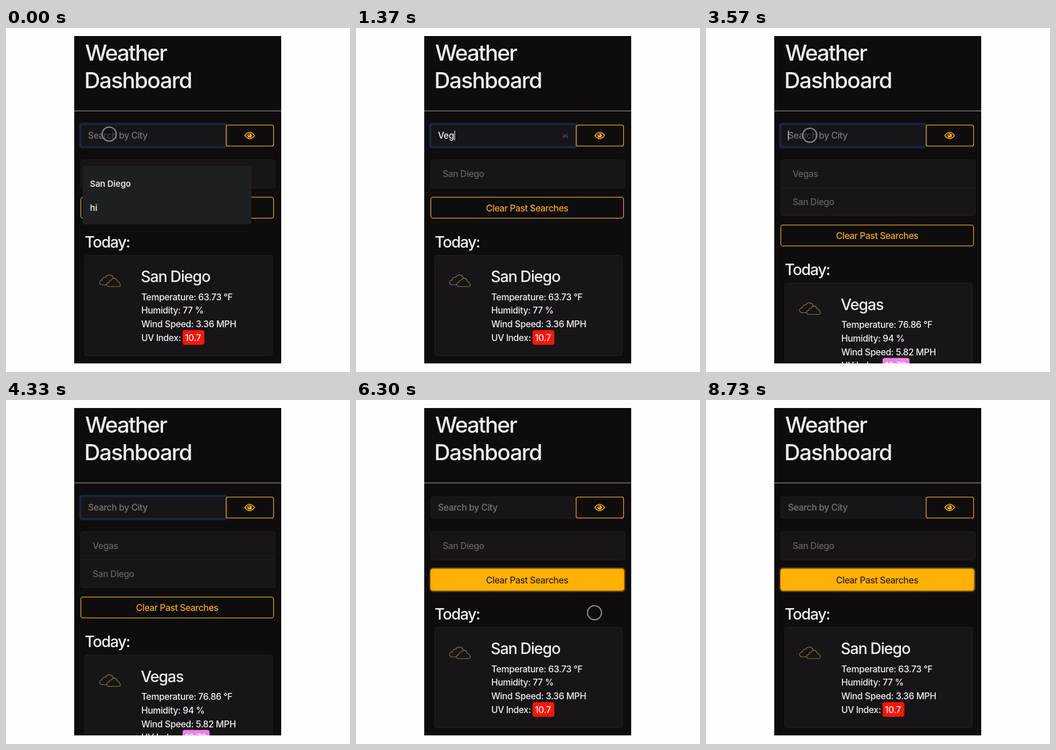
Animation of 600x600 px, one loop 9910 ms. Source, as an HTML page:

```html
<!DOCTYPE html>
<html lang="en">
<head>
<meta charset="utf-8">
<title>Weather Dashboard</title>
<style>
  html, body { margin: 0; width: 100%; height: 100%; overflow: hidden; background: #fefefe; }
  svg { display: block; width: 100vw; height: 100vh; }
  text {
    font: 450 15.6px Inter, "Open Sans", sans-serif;
    font-optical-sizing: none;
    letter-spacing: -.36px;
    fill: #f1eff0;
    white-space: pre;
  }
  .title { font-size: 38.5px; letter-spacing: -1.5px; }
  .title.tight { letter-spacing: -1.9px; }
  .heading { font-size: 27px; letter-spacing: -1.15px; }
  .heading.tight { letter-spacing: -1.45px; }
  .option { font-size: 14.8px; font-weight: 600; letter-spacing: -.15px; fill: #e3e4e6; }
  .muted { fill: #636163; }
  .hint { fill: #777577; }
  .panel { fill: #181518; stroke: #222022; }
  .outline { fill: none; stroke: #e0a42a; stroke-width: 1.3; }
  .cloud { fill: #181518; stroke: #84754e; stroke-width: 1.2; stroke-linejoin: round; }
</style>
</head>
<body>
<svg viewBox="0 0 600 600">
  <defs>
    <clipPath id="page"><rect x="119" y="14" width="361" height="571"/></clipPath>
    <filter id="soft" x="-10%" y="-30%" width="120%" height="160%"><feGaussianBlur stdDeviation=".8"/></filter>
  </defs>
  <g clip-path="url(#page)">
    <rect x="119" y="14" width="361" height="571" fill="#0f0c0e"/>
    <text class="title tight" x="138" y="56.5">Weather</text>
    <text class="title" x="136.5" y="104.5">Dashboard</text>
    <rect x="119" y="144" width="361" height="1.2" fill="#8f8b8c"/>

    <rect id="focus" x="130" y="167.5" width="254" height="40" rx="3" fill="none" stroke="#1c2d50" stroke-width="4" filter="url(#soft)"/>
    <rect class="panel" x="131" y="169" width="253" height="37" rx="3"/>
    <text id="query" x="143" y="193"></text>
    <rect id="caret" y="179" width="1.3" height="17" fill="#d8d8da"/>
    <path id="contact" d="M361.5 184.5l7 7m0-7l-7 7m0-4v4.5m7-4.5v4.5" fill="none" stroke="#496a92" stroke-width="1.2" stroke-dasharray="2 1"/>
    <rect class="outline" x="384" y="169.4" width="82.7" height="36.5" rx="3"/>
    <g transform="translate(425 187.5)">
      <path d="M-8.5 0Q0-11 8.5 0Q0 11-8.5 0Z" fill="none" stroke="#f2ac20" stroke-width="1.6" stroke-linejoin="round"/>
      <circle r="3.8" fill="#f2ac20"/>
      <circle cx="-1.2" cy="-1.2" r="1.2" fill="#0f0c0e"/>
    </g>

    <rect id="list" class="panel" x="130.5" y="230" width="339" rx="4"/>
    <text id="recent" class="muted" x="151" y="260"></text>
    <g id="older">
      <path d="M131 278.5H469" stroke="#242226"/>
      <text class="muted" x="151" y="308.5">San Diego</text>
    </g>

    <g id="results">
      <rect id="clearGlow" x="129" y="293" width="340" height="41" rx="5" fill="#a87808" filter="url(#soft)"/>
      <rect id="clear" class="outline" x="130.5" y="295.2" width="336.2" height="36.5" rx="4"/>
      <text id="clearLabel" x="298.5" y="319.5" text-anchor="middle">Clear Past Searches</text>
      <text class="heading tight" x="137.3" y="382.5">Today:</text>
      <rect class="panel" x="137.5" y="396.5" width="327" height="175" rx="4"/>
      <g class="cloud">
        <path d="M167 448a4.200 4.200 0 0 1 1-8.400a5 5 0 0 1 6-5a7 7 0 0 1 13 1.500a4.500 4.500 0 0 1 5 6a3.500 3.500 0 0 1-2 6Z"/>
        <path d="M179 451a3.600 3.600 0 0 1 .5-7.200a4 4 0 0 1 4-3.800a5.500 5.500 0 0 1 10.500 2a4 4 0 0 1 4 3.500a3 3 0 0 1-1 5.500Z"/>
      </g>
      <text id="city" class="heading" x="235" y="443"></text>
      <text id="temp" x="236" y="474.500"></text>
      <text id="humid" x="236" y="498.300"></text>
      <text id="wind" x="236" y="522"></text>
      <text x="236" y="545.700">UV Index:</text>
      <rect id="badge" x="308" y="527" height="25.500" rx="4"/>
      <text id="uv" x="312" y="545.700"></text>
    </g>

    <g id="menu">
      <rect x="134" y="241" width="294" height="101.500" rx="2" fill="#1d2023"/>
      <text class="option" x="146.500" y="277">San Diego</text>
      <text class="option" x="146.500" y="318.500">hi</text>
    </g>
    <circle id="pointer" r="12.200" fill="#0c0a0c" fill-opacity=".5" stroke="#858386" stroke-width="2.200"/>
  </g>
</svg>
<script>
  const LOOP = 9910, ROW = 48.5;
  const START = 0, TYPE = 1050, KEY = 140, SUBMIT = 1950, LOADED = 2200;
  const REFOCUS = 3500, HOVER = 5750, CLEARED = 5950;
  const el = Object.fromEntries([...document.querySelectorAll('[id]')].map(n => [n.id, n]));

  const reports = {
    sanDiego: { city: 'San Diego', temp: '63.73', humid: 77, wind: '3.36', uv: '10.7', badge: 38, color: '#fd1608' },
    vegas: { city: 'Vegas', temp: '76.86', humid: 94, wind: '5.82', uv: '10.73', badge: 47, color: '#ee82e8' }
  };

  // Pointer visits: each run is a list of [time, x, y].
  const runs = [
    [[START, 180, 185], [TYPE, 180, 185]],
    [[2900, 180, 185], [3500, 181, 187], [4050, 181, 187]],
    [[5250, 181, 187], [HOVER, 352, 360], [CLEARED, 370, 362], [6300, 416, 371],
     [6750, 390, 330], [7300, 290, 266], [7800, 330, 275], [8350, 500, 240]]
  ];

  const show = (node, on) => node.setAttribute('visibility', on ? 'visible' : 'hidden');
  const ease = p => p * p * (3 - 2 * p);

  function pointerAt(t) {
    const run = runs.find(r => t >= r[0][0] && t < r.at(-1)[0]);
    if (!run) return null;
    const i = run.findIndex(p => p[0] > t);
    const [a, b] = [run[i - 1], run[i]];
    const p = ease((t - a[0]) / (b[0] - a[0]));
    return [a[1] + (b[1] - a[1]) * p, a[2] + (b[2] - a[2]) * p];
  }

  function drawReport(r) {
    el.city.textContent = r.city;
    el.temp.textContent = `Temperature: ${r.temp} °F`;
    el.humid.textContent = `Humidity: ${r.humid} %`;
    el.wind.textContent = `Wind Speed: ${r.wind} MPH`;
    el.uv.textContent = r.uv;
    el.badge.setAttribute('width', r.badge);
    el.badge.setAttribute('fill', r.color);
  }

  function drawInput(t) {
    const typed = t >= TYPE && t < SUBMIT
      ? 'Vegas'.slice(0, 1 + Math.floor((t - TYPE) / KEY)) : '';
    el.query.textContent = typed || 'Search by City';
    el.query.setAttribute('class', typed ? '' : 'hint');
    const blink = t >= REFOCUS && t < HOVER && (t - REFOCUS) % 1000 < 500;
    show(el.caret, typed || blink);
    el.caret.setAttribute('x', typed ? 143.5 + el.query.getComputedTextLength() : 143);
    show(el.contact, typed);
    show(el.focus, t < CLEARED);
    show(el.menu, t < TYPE);
  }

  function drawResults(t) {
    const vegas = t >= LOADED && t < CLEARED;
    drawReport(vegas ? reports.vegas : reports.sanDiego);
    el.recent.textContent = vegas ? 'Vegas' : 'San Diego';
    show(el.older, vegas);
    el.list.setAttribute('height', vegas ? 97 : 49);
    el.results.setAttribute('transform', `translate(0 ${vegas ? ROW : 0})`);
    const active = t >= HOVER;
    show(el.clearGlow, active);
    el.clear.style.fill = active ? '#ffb000' : 'none';
    el.clear.style.stroke = active ? '#ffb000' : '';
    el.clearLabel.style.fill = active ? '#2d2516' : '#efa91d';
  }

  function frame() {
    const t = performance.now() % LOOP;
    drawInput(t);
    drawResults(t);
    const at = pointerAt(t);
    show(el.pointer, at);
    if (at) el.pointer.setAttribute('transform', `translate(${at})`);
    requestAnimationFrame(frame);
  }
  frame();
</script>
</body>
</html>
```
